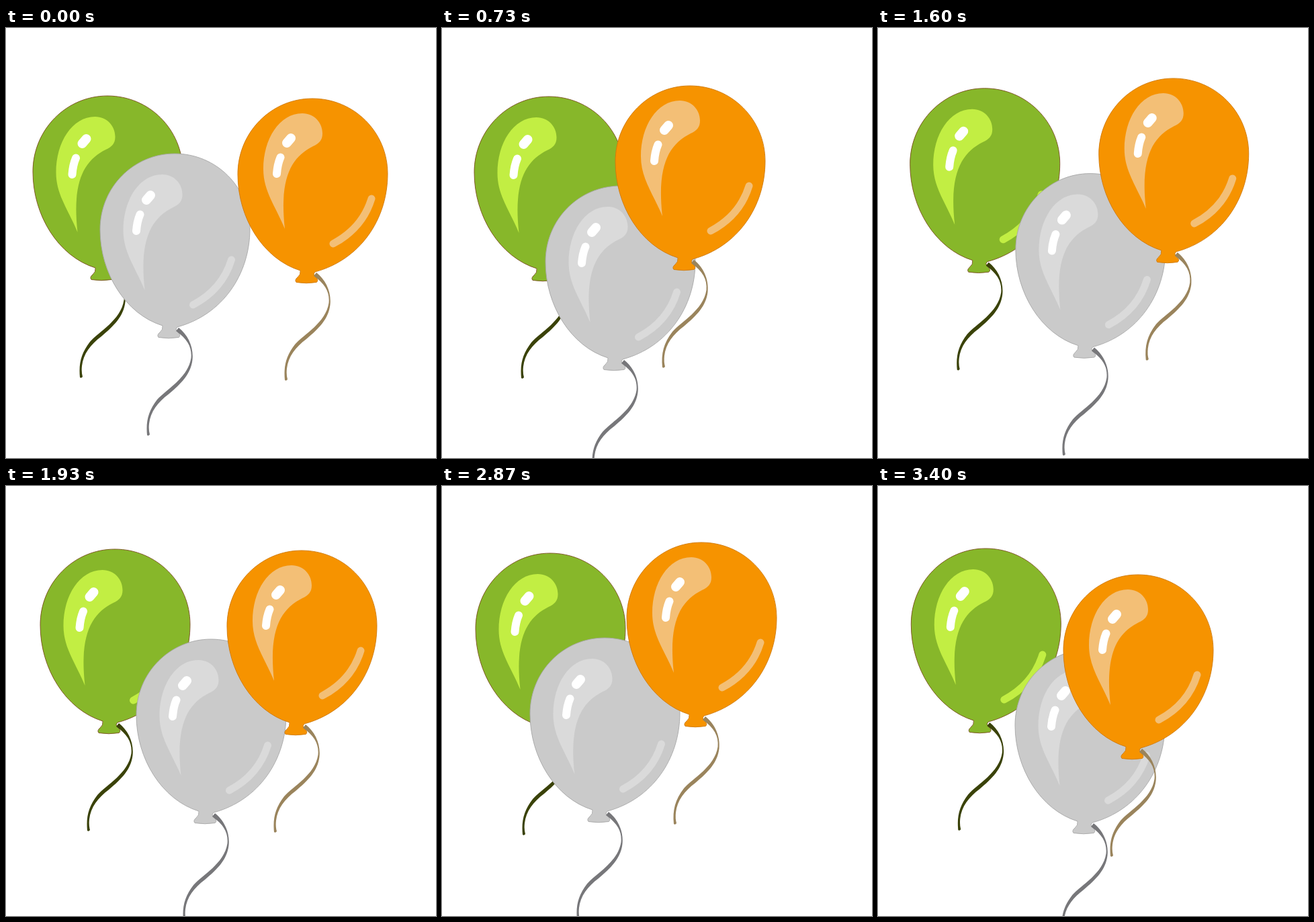
An HTML page for the animation above (3430 ms loop, 640x640 px).

```html
<!DOCTYPE html>
<html lang="en">
<head>
<meta charset="utf-8">
<title>Balloons</title>
<style>
  html, body { margin: 0; width: 100%; height: 100%; overflow: hidden; background: #fff; }
  svg { display: block; width: 100%; height: 100%; }
</style>
</head>
<body>
<svg id="stage" viewBox="0 0 640 640"></svg>
<script>
const LOOP = 3430;
const STEP = 100 / 3;

// Shapes in balloon space: left edge at x = 0, top at y = 0
const BODY = 'M93 256C38 239 0 178 0 113C0 50 50 0 111 0C173 0 223 50 223 112' +
  'C223 180 182 240 115 258L113 261Q114 265 118 268Q120 272 117 273.5Q102 276 87 273.5' +
  'Q84 270 89 266Q94 262 93 256Z';
const RIBBON = 'M117 259C131 270 139.5 288 137.5 307C135 328 121 342 102 358' +
  'C86 370 75 384 73 402Q72 411 74 418Q72 421 70 419' +
  'C68 398 72 383 85 366C98 351 131 334 135.5 304C137 288 130 276 113 264Z';
const SHINE = 'M70 194C56 160 38 138 38 105C38 60 62 22 96 22C114 22 126 36 126 52' +
  'C126 62 121 67 112 71C80 87 61.5 118 70 194Z';
const STREAK = 'M199 149Q185.5 193 142 216';
const DOT = 'M73 66L79 59';
const DASH = 'M63.5 87.5Q59 98 58 112';

// Back to front. Each balloon drifts through one pose per beat
// and rises by "lift" halfway between two beats.
const BEATS = [0, 733, 1267, 1933, 2367, 2867, 3400];
const balloons = [
  {
    body: '#87b72a', edge: '#7a4f22', shine: '#c2ee43', ribbon: '#3a4208',
    gloss: [-3.5, 9], spots: [0.5, 5], lift: 3,
    x: [40, 48, 44, 51, 44, 50, 49.3],
    y: [101, 102, 92, 94, 87.5, 100, 93]
  },
  {
    body: '#cacaca', edge: '#a8a8a8', shine: '#dadada', ribbon: '#77777a',
    gloss: [-3.5, 9], spots: [-4, 3], lift: 0,
    x: [140, 154, 204, 194, 163, 131, 204],
    y: [187, 235, 213, 228, 258, 226, 243]
  },
  {
    body: '#f69300', edge: '#cf7a0c', shine: '#f3bf76', ribbon: '#9a845c',
    gloss: [0, 0], spots: [0, 0], lift: 20,
    x: [345, 258, 315, 329, 291, 275, 276],
    y: [105, 86, 98, 96, 134, 84, 132]
  }
];

function add(parent, name, attrs) {
  const el = document.createElementNS('http://www.w3.org/2000/svg', name);
  for (const key in attrs) el.setAttribute(key, attrs[key]);
  return parent.appendChild(el);
}

function group(parent, [x, y]) {
  return add(parent, 'g', { transform: `translate(${x} ${y})` });
}

function fill(parent, d, color, edge = 'none') {
  add(parent, 'path', { d, fill: color, stroke: edge, 'stroke-width': 0.9 });
}

function line(parent, d, color, width) {
  add(parent, 'path', {
    d, fill: 'none', stroke: color, 'stroke-width': width, 'stroke-linecap': 'round'
  });
}

function build(b) {
  b.node = add(document.getElementById('stage'), 'g', {});
  fill(b.node, BODY, b.body, b.edge);
  const gloss = group(b.node, b.gloss);
  fill(gloss, SHINE, b.shine);
  line(gloss, STREAK, b.shine, 11);
  const spots = group(b.node, b.spots);
  line(spots, DOT, '#fff', 14);
  line(spots, DASH, '#fff', 12);
  fill(b.node, RIBBON, b.ribbon);
}

function slope(values, i) {
  const a = Math.max(i - 1, 0);
  const b = Math.min(i + 1, BEATS.length - 1);
  return (values[b] - values[a]) / (BEATS[b] - BEATS[a]);
}

// Smooth cubic between beats i and i + 1, at u from 0 to 1
function glide(values, i, u) {
  const v = 1 - u;
  const span = BEATS[i + 1] - BEATS[i];
  return values[i] * v * v * (1 + 2 * u) + values[i + 1] * u * u * (3 - 2 * u) +
    span * u * v * (v * slope(values, i) - u * slope(values, i + 1));
}

function draw(ms) {
  const t = Math.floor((ms % LOOP + 5) / STEP) * STEP;
  let i = 0;
  while (i < BEATS.length - 2 && t > BEATS[i + 1]) i++;
  const u = Math.min((t - BEATS[i]) / (BEATS[i + 1] - BEATS[i]), 1);
  const rise = Math.sin(Math.PI * u) ** 2;
  for (const b of balloons) {
    const x = glide(b.x, i, u).toFixed(2);
    const y = (glide(b.y, i, u) - b.lift * rise).toFixed(2);
    b.node.setAttribute('transform', `translate(${x} ${y})`);
  }
}

balloons.forEach(build);
draw(0);
let start;
function tick(now) {
  if (start === undefined) start = now;
  draw(now - start);
  requestAnimationFrame(tick);
}
requestAnimationFrame(tick);
</script>
</body>
</html>
```
